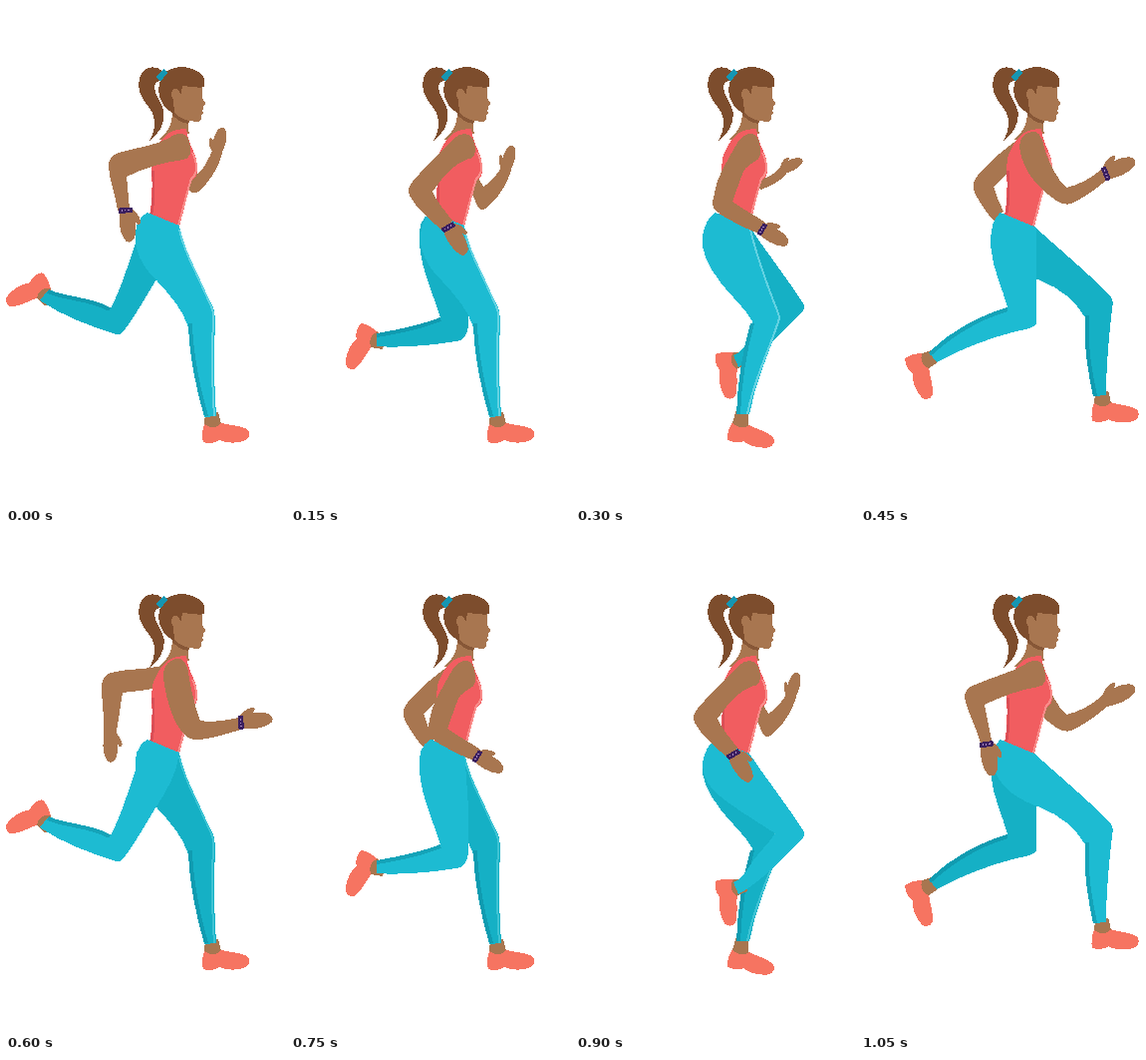
An HTML page that plays this animation: 280 px wide and 500 px high, repeating every 1200 ms.

```html
<!DOCTYPE html>
<html lang="en">
<head>
<meta charset="utf-8">
<title>Running woman</title>
<style>
html, body { margin: 0; width: 100%; height: 100%; overflow: hidden; background: #fff; }
svg { display: block; width: 100%; height: 100%; }
</style>
</head>
<body>
<svg id="stage" viewBox="0 0 280 500" shape-rendering="crispEdges"></svg>
<script>
const STEP = 150, STEPS = 8;
const SKIN = '#a87650', HAIR = '#7d4d2d', RED = '#f15d60', SHOE = '#f67461';
const NEAR = { fill: '#1dbbd2', shade: '#15a3b8', light: '#62d2e2' };
const FAR = { fill: '#15b0c5', shade: '#109bb0', light: '#3cc3d4' };

const fill = (d, color) => `<path d="${d}" fill="${color}"/>`;
const line = (d, color, w) => d ? `<path d="${d}" fill="none" stroke="${color}" stroke-width="${w}"/>` : '';
const place = (x, y, turn, size, body) =>
  `<g transform="translate(${x} ${y}) rotate(${turn}) scale(${size})">${body}</g>`;

// Each leg: outline, shoe [x, y, angle], shaded edge, lit seam.
const contact = {
  d: 'M142 207L174 220C176 235 182 250 190 266L207 300Q210 306 210 318C208 350 209 380 211 411L199 412C190 380 184 350 183 322C178 305 165 290 152 276C138 262 126 245 131 222Q134 211 142 207Z',
  shoe: [207, 418, 0],
  shade: 'M185 318C186 350 192 380 201 411',
  light: 'M174 224C177 238 182 250 190 266L206 301Q209 307 208 318C206 350 207 380 209 411'
};
const trail = {
  d: 'M142 207L174 220C172 240 162 257 151 274C140 292 130 310 118 326Q114 331 108 328C85 321 55 310 34 295L43 284C60 292 85 291 105 303C115 285 122 260 130 238C128 225 132 212 142 207Z',
  shoe: [38.5, 288, 148],
  shade: 'M42 286C60 294 85 293 104 304'
};
const fold = {
  d: 'M140 207L174 221C176 245 180 290 178 320Q176 335 166 336C140 340 110 343 86 341L86 328C110 324 135 318 150 312C143 290 130 262 129 238C127 222 131 212 140 207Z',
  shoe: [84, 334, 114],
  shade: 'M86 330C110 326 135 320 150 314'
};
const stand = {
  d: 'M140 207L174 222C180 250 190 275 204 308Q206 314 203 320C195 345 180 375 174 409L161 409C162 382 166 350 177 316C170 303 155 290 145 277C132 260 125 245 127 230Q130 213 140 207Z',
  shoe: [165, 418, 13],
  shade: 'M177 318C168 350 164 382 163 409',
  light: 'M175 224C181 250 190 275 203 308Q205 313 202 319C194 345 178 375 172 409'
};
const swing = {
  d: 'M140 207L174 221C190 245 210 270 228 298Q231 303 226 308C215 318 205 330 195 338C185 347 175 355 163 362L158 350Q164 348 170 340C178 325 193 312 200 301C175 285 150 270 137 257Q127 245 127 230Q130 213 140 207Z',
  shoe: [160, 355, 80]
};
const reach = {
  d: 'M140 207L174 221C195 240 225 265 250 290Q254 296 252 303C249 330 246 360 246 390L233 391C228 368 223 340 225 312C215 295 200 283 180 275C160 268 142 258 134 238Q130 215 140 207Z',
  shoe: [242, 397, 2],
  shade: 'M227 310C225 340 230 367 235 391'
};
const push = {
  d: 'M140 207L176 222L176 318Q174 322 165 324C140 329 105 341 76 357L68 347C90 325 120 310 147 302C143 285 132 265 130 240C130 222 133 212 140 207Z',
  shoe: [65, 355, 69],
  shade: 'M69 349C92 328 120 312 147 304'
};
const strides = [[contact, trail], [contact, fold], [stand, swing], [push, reach]];

// Each arm: outline and hand [x, y, angle, size].
const nearArm = {
  back: ['M164 132C172 125 182 127 184 136C187 146 185 153 178 154C160 156 136 163 121 171L124 203L112 205C110 190 103 172 103 160Q103 150 113 147C130 142 150 140 164 132Z', [120, 205, 85, 1]],
  low: ['M164 132C173 125 182 128 184 137C187 147 184 153 176 154C165 157 154 169 142 186C147 197 155 206 162 215L152 225C140 215 125 202 119 190Q116 183 122 176C135 160 148 150 164 132Z', [158, 222, 60, 1]],
  down: ['M162 137C170 125 182 125 184 137C187 147 185 154 179 156C171 160 168 165 166 171L157 196C168 204 180 210 190 217L183 228C168 222 150 213 140 205Q135 199 138 192C140 172 152 155 162 137Z', [187, 224, 32, .92]],
  front: ['M159 142C158 130 168 125 175 126C181 128 183 137 185 146C190 160 198 175 206 182C220 179 232 172 242 163L248 173C236 184 222 193 211 198Q204 200 196 195C178 183 162 165 159 142Z', [246, 168, -22, 1]],
  level: ['M158 145C157 130 168 125 175 126C181 128 183 137 184 146C187 162 190 176 195 188C205 190 220 188 234 185L236 197C222 201 210 205 195 207Q186 208 180 203C169 193 161 170 158 145Z', [236, 190, -5, 1]],
  rise: ['M164 132C172 125 182 127 184 136C187 146 185 153 178 154C160 157 140 164 124 172L131 208L120 211C116 195 106 178 104 165Q104 156 112 153C130 145 150 140 164 132Z', [126, 212, 82, 1]]
};
const farArm = {
  up: ['M178 150L192 168C198 165 204 152 208 143L217 147C214 162 203 178 193 186Q187 189 184 185L172 160Z', [212, 146, -74, .78]],
  half: ['M178 155L193 181C201 177 208 168 212 159L221 164C217 180 205 196 195 203Q190 206 187 200L172 165Z', [216, 163, -72, .75]],
  small: ['M180 160L186 173C194 172 201 167 206 160L211 168C205 176 195 180 186 184L174 178Z', [208, 164, -25, .68]],
  hip: ['M160 132C145 142 130 155 117 170Q110 179 114 187C119 197 126 207 133 215L143 206C139 198 136 190 133 181L160 155Z'],
  back: ['M158 133C140 137 118 136 105 140Q96 143 96 154C96 170 99 185 98 201L110 203C113 188 115 172 117 160C130 158 150 158 165 150Z', [104, 201, 90, .9]],
  front: nearArm.front
};
const nearSwing = ['back', 'low', 'down', 'front', 'level', 'down', 'low', 'rise'];
const farSwing = ['up', 'half', 'small', 'hip', 'back', 'hip', 'half', 'front'];

const palm = fill('M-2 -6C2 -10 5 -13 12 -14C16 -14 16 -11 12 -9C18 -9 24 -9 29 -6C33 -3 33 2 28 4C20 8 10 8 -2 6Z', SKIN);
const band = '<rect x="-3" y="-7" width="5.5" height="14" rx="1.5" fill="#3b1f5f"/>' +
  '<path d="M-.3 -4V4" stroke="#a98bc4" stroke-width="1.5" stroke-dasharray="1.5 2"/>';
const foot = fill('M-7 -11L6 -11L9 1Q0 8 -8 2Z', SKIN) +
  fill('M-8 1C-10 7 -11 15 -9 19C-3 21 3 20 7 17C13 20 25 21 34 17C38 14 38 9 35 6C27 2 17 2 9 0C4 6 -3 5 -8 1Z', SHOE);

const ponytail = fill('M156 65C146 57 132 62 132 79C132 92 142 99 146 107C150 117 148 126 143 135C152 129 159 118 157.500 106C156 97 148 90 148 81Q149 75 154 75Z', HAIR);

const head =
  fill('M166 80L197 79C198 84 196 89 197 92L200 97Q201 99 198 100L198 103L196 105L198 107L196 110Q198 115 192 116L184 115Q182 121 184 128L154 134C163 126 167 119 167 106Z', SKIN) +
  fill('M168 105C172 111 178 114 184 115L183 118C176 117 170 113 167 109Z', '#875737') +
  fill('M155 74C158 64 168 61 177 61C189 62 199 68 199 75L199 81C192 83 183 80 177 80L175 91C175 85 172 82 169 83C165 85 165 90 168 94L169 108C161 105 153 95 153 84Z', HAIR) +
  fill('M151 71L158 63L162 67L155 76Z', '#1596b2');

const torso =
  fill('M146 165L147 152C150 143 155 134 162 128C168 124 175 123 181 123L183 133C186 144 192 150 192 160C193 169 190 173 186 175L184 183L174 221L144 210C147 195 147 180 146 165Z', RED) +
  line('M147.500 165C148.500 180 148.500 195 146 209', '#d94e56', 2.5) +
  line('M187 147C192 156 193 168 186 173L183 183L173 220', '#f98c8a', 2);

function leg({ d, shoe, shade, light }, tone) {
  return place(...shoe, 1, foot) + fill(d, tone.fill) +
    line(shade, tone.shade, 4) + line(light, tone.light, 2);
}

function arm([d, hand], extra = '') {
  return fill(d, SKIN) + (hand ? place(...hand, palm + extra) : '');
}

function scene(step) {
  const pair = strides[step % 4];
  const [near, far] = step < 4 ? pair : [pair[1], pair[0]];
  const sway = step % 4 === 0 ? 1 : 0;
  return arm(farArm[farSwing[step]]) +
    place(sway, 0, 0, 1, ponytail) +
    head + leg(far, FAR) + torso + leg(near, NEAR) +
    arm(nearArm[nearSwing[step]], band);
}

const stage = document.getElementById('stage');
const start = performance.now();
let shown = -1;

function tick() {
  const step = Math.floor((performance.now() - start) / STEP) % STEPS;
  if (step !== shown) {
    stage.innerHTML = scene(step);
    shown = step;
  }
  requestAnimationFrame(tick);
}
tick();
</script>
</body>
</html>
```
